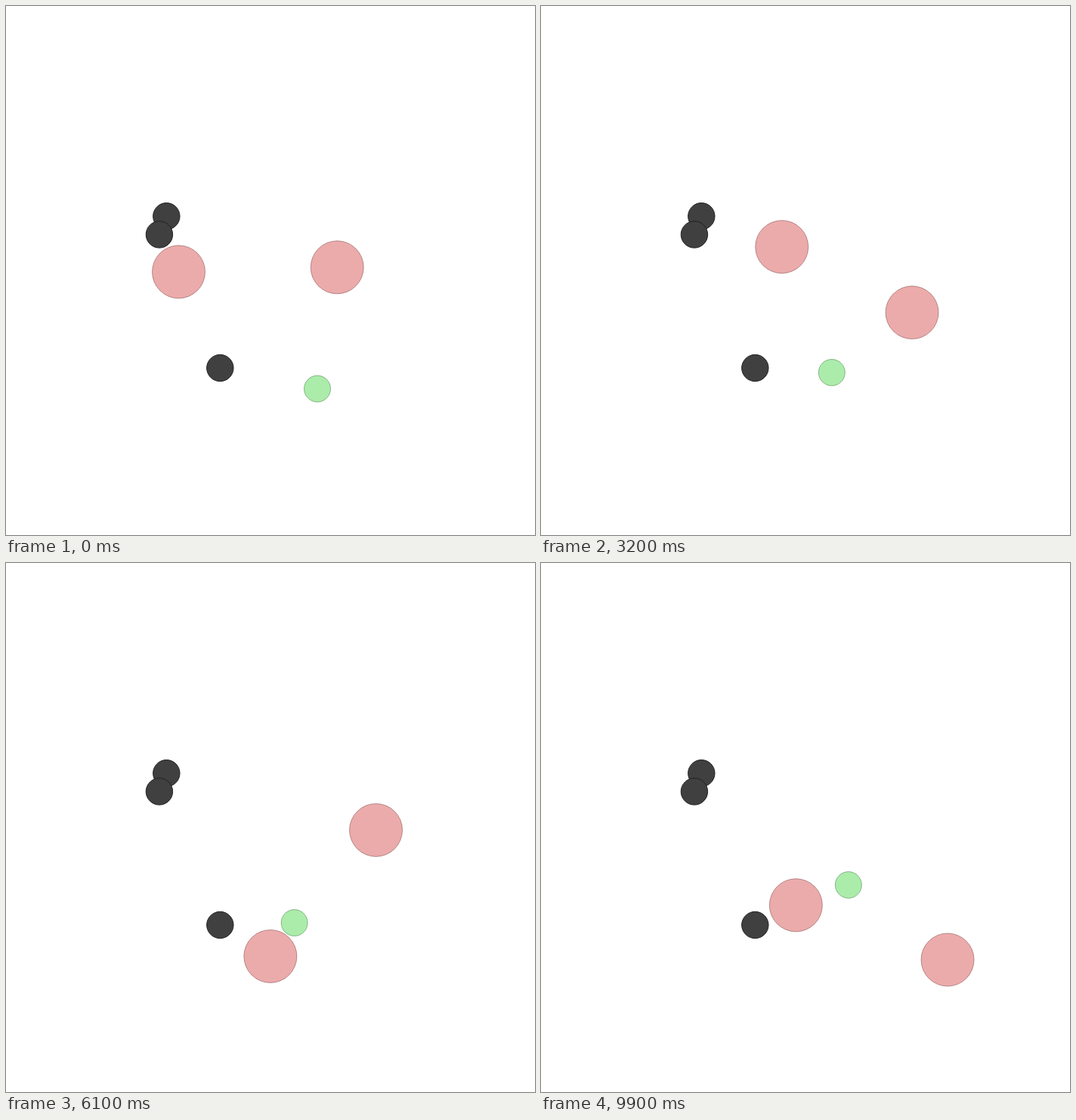
Animation of 700x700 px, one loop 10000 ms. Source, as an HTML page with a canvas:

```html
<!DOCTYPE html>
<html lang="en">
<head>
<meta charset="utf-8">
<title>Pursuit</title>
<style>
html, body { margin: 0; width: 100%; height: 100%; overflow: hidden; background: #fff; }
canvas { display: block; }
</style>
</head>
<body>
<canvas id="stage" width="700" height="700"></canvas>
<script>
const ctx = document.getElementById('stage').getContext('2d');
const STEP = 100, STEPS = 100;

// Steps at which the agents change course, and the points they pass then
const turns = [0, 18, 22, 32, 40, 51, 64, 73, 80, 88, 99];
const red = { r: 35, fill: 'rgba(217,89,89,.5)', line: 'rgba(108,45,45,.45)' };
const green = { r: 17.5, fill: 'rgba(89,217,89,.5)', line: 'rgba(45,108,45,.45)' };
const black = { r: 17.7, fill: '#404040', line: '#202020' };

const agents = [
  { look: red,
    x: [228.5, 239, 251.5, 318.7, 399, 482.6, 491, 495.3, 500, 530, 538],
    y: [351.8, 337.2, 330.5, 318.7, 286.5, 314, 361, 370, 429, 484.2, 525] },
  { look: red,
    x: [438.2, 391.4, 433, 491, 499, 477.2, 332, 339.2, 321.5, 348.2, 337.3],
    y: [345.8, 428.5, 431, 405.6, 430, 466.5, 526.5, 520, 513, 485.8, 452.8] },
  { look: green,
    x: [412, 403.4, 398.5, 384.8, 373.5, 379.7, 382, 382.8, 385, 385.6, 406.8],
    y: [506.5, 501.8, 496, 485, 489.5, 477.7, 476, 476, 465, 446.7, 426] }
];
const landmarks = [[212.3, 278.2], [202.9, 302.4], [283.3, 479]];

const slope = (v, i) => (v[i + 1] - v[i]) / (turns[i + 1] - turns[i]);

// Harmonic mean of the neighbouring slopes, flat at turning points
function tangent(v, i) {
  if (i === 0) return 0;
  const before = slope(v, i - 1);
  if (i === v.length - 1) return before;
  const after = slope(v, i);
  return before * after > 0 ? 2 * before * after / (before + after) : 0;
}

function glide(v, step) {
  const i = Math.min(turns.findLastIndex(t => t <= step), turns.length - 2);
  const span = turns[i + 1] - turns[i];
  const p = (step - turns[i]) / span, q = 1 - p;
  return q * q * (1 + 2 * p) * v[i] + p * p * (1 + 2 * q) * v[i + 1]
    + span * p * q * (q * tangent(v, i) - p * tangent(v, i + 1));
}

function disc(x, y, { r, fill, line }) {
  ctx.beginPath();
  ctx.arc(x, y, r, 0, 2 * Math.PI);
  ctx.fillStyle = fill;
  ctx.fill();
  ctx.strokeStyle = line;
  ctx.stroke();
}

function draw() {
  const step = Math.floor(performance.now() / STEP) % STEPS;
  ctx.fillStyle = '#fff';
  ctx.fillRect(0, 0, 700, 700);
  for (const { x, y, look } of agents) disc(glide(x, step), glide(y, step), look);
  for (const [x, y] of landmarks) disc(x, y, black);
  requestAnimationFrame(draw);
}
draw();
</script>
</body>
</html>
```
